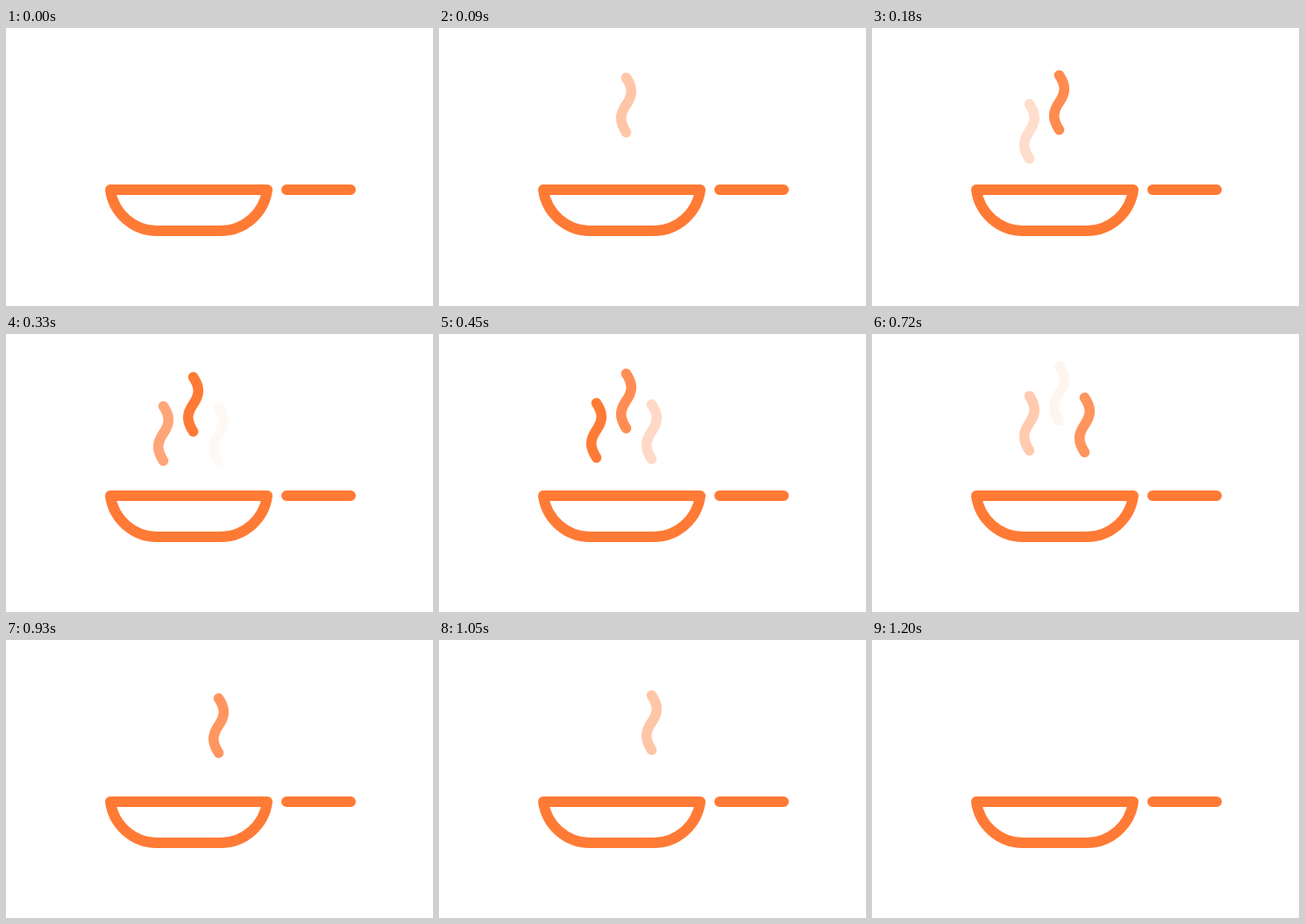
An HTML page that plays this animation: 487x318 px, repeating every 1.38 s.

```html
<!DOCTYPE html>
<html lang="en">
<head>
<meta charset="utf-8">
<title>Steaming pan</title>
<style>
  html, body { margin: 0; height: 100%; overflow: hidden; background: #fff; }
  svg { display: block; width: 487px; height: 318px; }
</style>
</head>
<body>
<svg viewBox="0 0 487 318" fill="none" stroke="#ff7a35" stroke-width="12" stroke-linecap="round" stroke-linejoin="round">
  <path d="M119 185H298A54 54 0 0 1 245 232H172A54 54 0 0 1 119 185ZM320 185H393"/>
  <g id="steam" stroke-width="11.6"></g>
</svg>
<script>
const LOOP = 1380, STEP = 30;
// y: height at time 0, speed: px per ms, fade: start, full, hold end, gone (ms)
const wisps = [
  { x: 179.5, y: 92.4, speed: 0.0298, fade: [91, 448, 506, 863] },
  { x: 213.5, y: 59.7, speed: 0.0318, fade: [0, 208, 398, 748] },
  { x: 242.5, y: 93.5, speed: 0.0288, fade: [305, 820, 855, 1200] }
];
const steam = document.getElementById('steam');

for (const wisp of wisps) {
  wisp.path = document.createElementNS(steam.namespaceURI, 'path');
  wisp.path.setAttribute('d', 'M0 0C8 12 7.5 20 0 31S-8 50 0 62.5');
  steam.append(wisp.path);
}

function opacityAt(t, [start, full, holdEnd, gone]) {
  const rise = (t - start) / (full - start);
  const fall = (gone - t) / (gone - holdEnd);
  return Math.max(0, Math.min(1, rise, fall));
}

function draw(now) {
  const t = Math.floor((now % LOOP) / STEP) * STEP;
  for (const { x, y, speed, fade, path } of wisps) {
    path.setAttribute('transform', `translate(${x} ${y - speed * t})`);
    path.setAttribute('opacity', opacityAt(t, fade));
  }
}

const begin = performance.now();
function tick() {
  draw(performance.now() - begin);
  requestAnimationFrame(tick);
}
tick();
</script>
</body>
</html>
```
